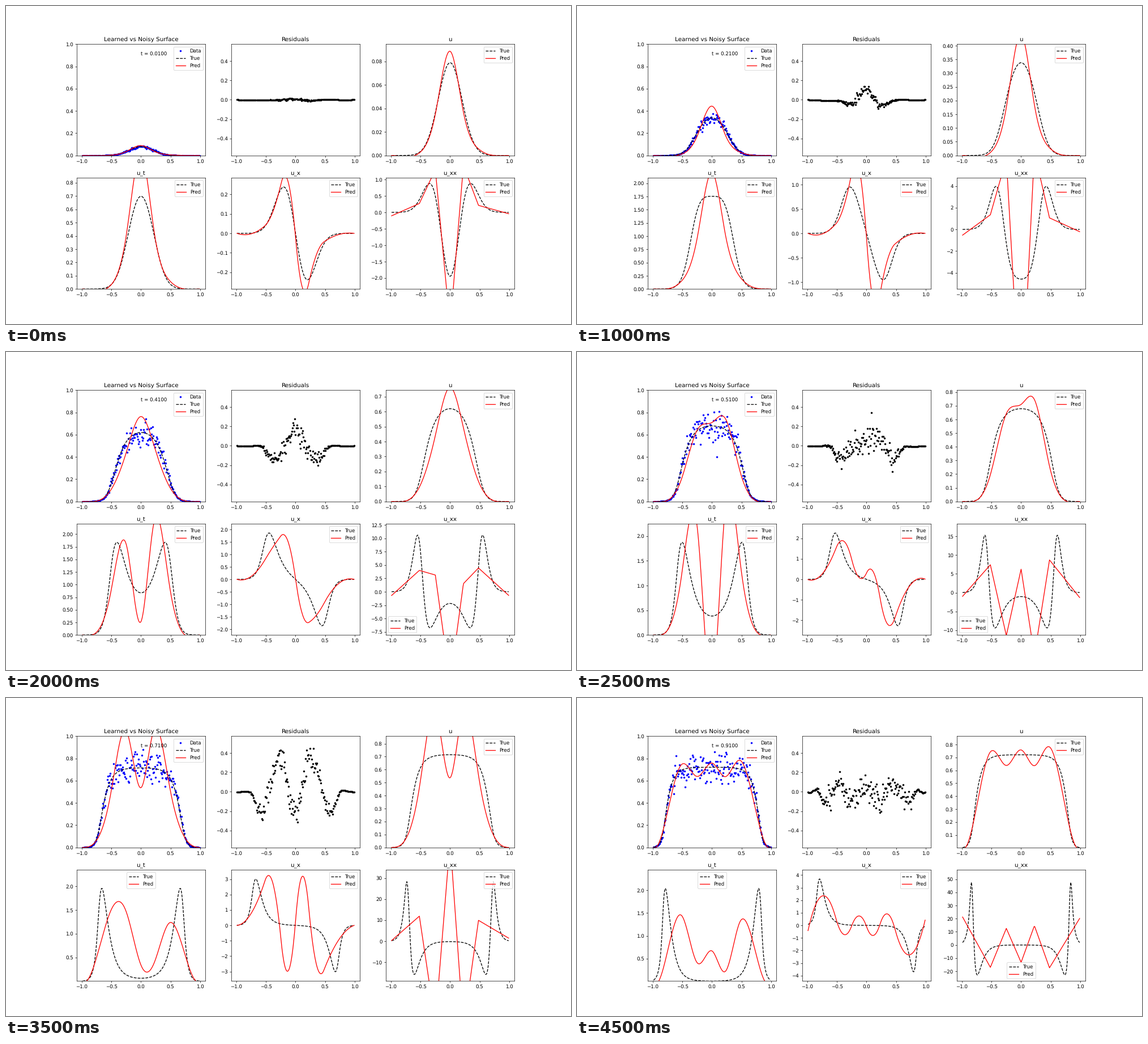
These frames come from a looping animation (998x561 px, 5000 ms). A matplotlib script:

```python
import numpy as np
import matplotlib.pyplot as plt
from matplotlib.animation import FuncAnimation
from matplotlib.ticker import AutoLocator

plt.rcParams["text.hinting"] = "none"
DPI = 62.375
N = 10
TIMES = 0.01 + 0.1 * np.arange(N)
CAP = 0.7215          # carrying capacity
GROWTH, DIFF = 10, 0.02


def simulate(dx=0.01, dt=1e-4):
    """Nonlinear Fisher-KPP: v_t = D (v v_x)_x + r v (1 - v)."""
    x = np.arange(-110, 111) * dx
    v = 0.1 * np.exp(-x**2 / 0.08)
    states, crop = [], slice(11, -11)
    for step in range(9101):
        flux = DIFF * (v[1:] + v[:-1]) / 2 * np.diff(v) / dx
        rate = GROWTH * v * (1 - v)
        rate[1:-1] += np.diff(flux) / dx
        if step % 1000 == 100:
            vxx = np.zeros_like(v)
            vxx[1:-1] = np.diff(v, 2) / dx**2
            parts = (v, rate, np.gradient(v, dx), vxx)
            states.append([CAP * p[crop] for p in parts])
        v = v + dt * rate
    return x[crop], states


def basis(x, knots, d=0):
    """d-th derivative of the cubic truncated power basis."""
    x = np.asarray(x, float)

    def power(y, n):
        return np.prod(np.arange(n, n - d, -1)) * y**max(n - d, 0)

    cols = [power(x, n) for n in range(4)]
    cols += [power(np.maximum(x - k, 0), 3) for k in knots]
    return np.stack(cols, axis=1)


# Fitted surface: a clamped cubic spline in x and in t.
X_KNOTS = [-0.52, -0.25, 0, 0.225, 0.48]
SITES = [-0.5, -0.25, 0, 0.25, 0.5]
ENDS = [-0.99, 0.99]
NODES = np.array([0.01, 0.21, 0.41, 0.61, 0.71, 0.81, 0.91])
HEIGHTS = np.array([          # at SITES, from the second node on
    [0.015, 0.175, 0.443, 0.155, 0.024],
    [0.112, 0.440, 0.763, 0.450, 0.116],
    [0.370, 0.862, 0.588, 0.965, 0.360],
    [0.520, 1.050, 0.537, 1.080, 0.500],
    [0.655, 1.010, 0.643, 0.976, 0.620],
    [0.751, 0.638, 0.758, 0.642, 0.772],
])
END_RATE = [1.42, 0.41, 0.67, 0.27, 1.36]


def surface(x):
    first = HEIGHTS[0] / 5
    heights = np.vstack([first, HEIGHTS, 11.5 * first, END_RATE])
    edge = np.append(-2.1 * np.maximum(NODES - 0.71, 0), [0, -2.4])
    zero = 0 * edge
    keys = np.column_stack([heights, zero, zero, edge, -edge])

    t_knots = NODES[1:-1]
    in_t = np.vstack([basis(NODES, t_knots), basis(NODES[[0, -1]], t_knots, 1)])
    in_x = np.vstack([basis(SITES, X_KNOTS), basis(ENDS, X_KNOTS),
                      basis(ENDS, X_KNOTS, 1)])
    coef = np.linalg.solve(in_x, np.linalg.solve(in_t, keys).T).T

    def values(dt, dx):
        return basis(TIMES, t_knots, dt) @ coef @ basis(x, X_KNOTS, dx).T

    return list(zip(values(0, 0), values(1, 0), values(0, 1), values(0, 2)))


X, TRUE = simulate()
PRED = surface(X)
rng = np.random.default_rng(4)
DATA = [s[0] * (1 + 0.1 * rng.standard_normal(X.size)) for s in TRUE]

fig, axes = plt.subplots(2, 3, figsize=(16, 8.994), dpi=DPI)
fig.subplots_adjust(left=0.125, right=0.9, bottom=0.11, top=0.88,
                    wspace=0.2, hspace=0.2)
axes = axes.ravel()
titles = ["Learned vs Noisy Surface", "Residuals", "u", "u_t", "u_x", "u_xx"]
for ax, title in zip(axes, titles):
    ax.set_title(title)
    ax.set_xlim(-1.089, 1.089)
    ax.set_xticks([-1, -0.5, 0, 0.5, 1])


def curve_pair(ax):
    true, = ax.plot([], [], "k--", label="True")
    pred, = ax.plot([], [], "r-", label="Pred")
    return true, pred


top, res = axes[:2]
dots, = top.plot([], [], "b.", label="Data")
top_pair = curve_pair(top)
top.set_ylim(0, 1)
top.legend(loc="upper right")
clock = top.text(0, 0.9, "")
res_dots, = res.plot([], [], "k.")
res.set_ylim(-0.575, 0.575)
panels = [(ax, curve_pair(ax)) for ax in axes[2:]]


def legend_spot(title, i):
    """The legend moves out of the way of the curves."""
    if title == "u_t" and i >= 7:
        return "upper center"
    if title == "u_xx" and 4 <= i <= 6:
        return "lower left"
    if title == "u_xx" and i >= 8:
        return "upper center" if i == 8 else "lower center"
    return "upper right"


def scale_y(ax, y):
    lo, hi = 1.2 * y.min(), 1.2 * y.max()
    slack = 0.0018 * (hi - lo)
    ticks = [t for t in AutoLocator().tick_values(lo, hi)
             if lo - slack <= t <= hi + slack]
    ax.set_yticks(ticks)
    ax.set_ylim(min(lo, ticks[0]), max(hi, ticks[-1]))


def update(i):
    true, pred, data = TRUE[i], PRED[i], DATA[i]
    dots.set_data(X, data)
    res_dots.set_data(X, pred[0] - data)
    clock.set_text(f"t = {TIMES[i]:.4f}")
    for line, y in zip(top_pair, (true[0], pred[0])):
        line.set_data(X, y)
    for (ax, pair), yt, yp in zip(panels, true, pred):
        pair[0].set_data(X, yt)
        pair[1].set_data(X, yp)
        scale_y(ax, yt)
        ax.legend(loc=legend_spot(ax.get_title(), i))
    return []


anim = FuncAnimation(fig, update, frames=N, interval=500, repeat=True)
plt.show()
```
